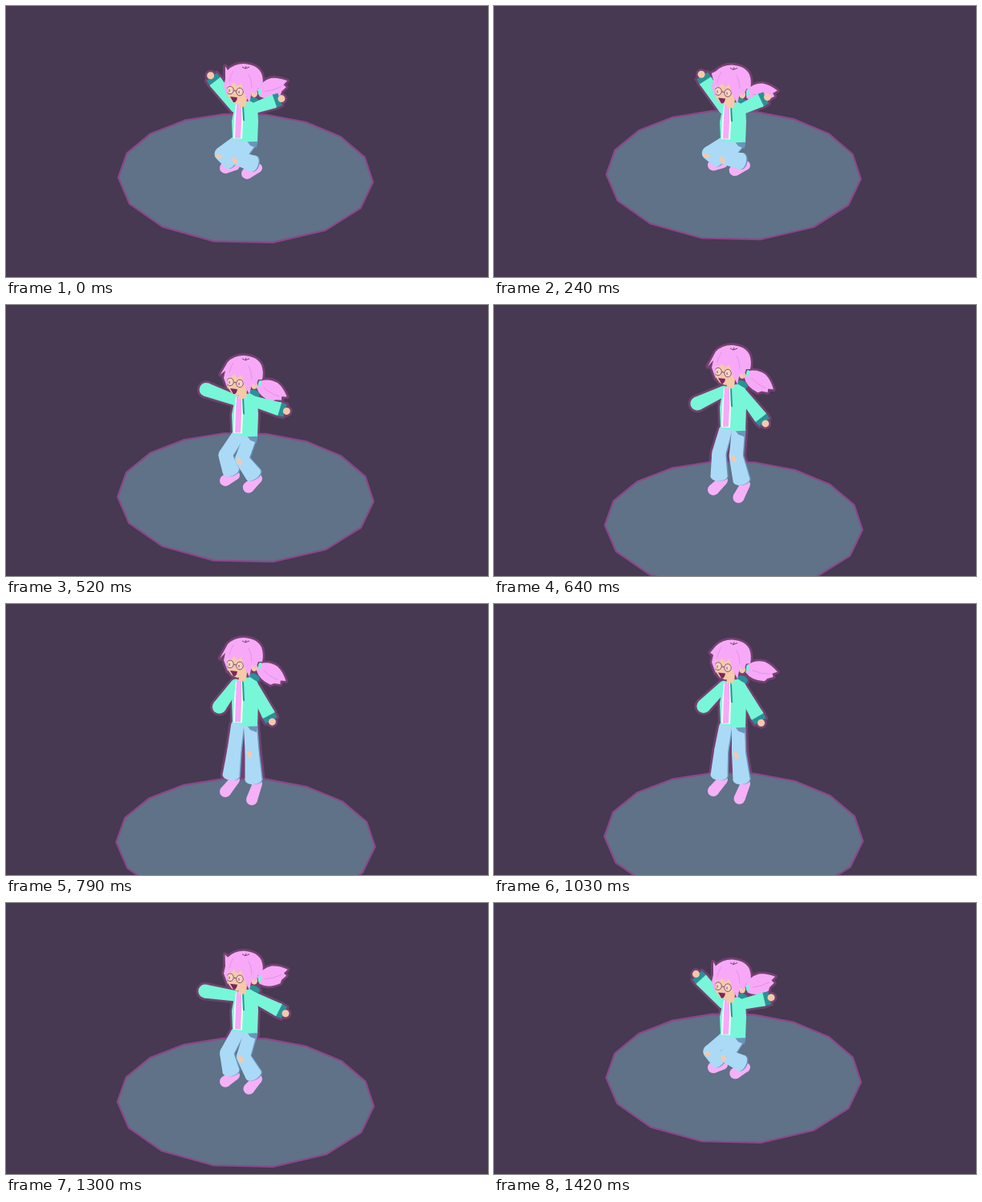
These frames come from a looping animation (600x338 px, 1450 ms). An HTML page with a canvas:

```html
<!DOCTYPE html>
<html lang="en">
<head>
<meta charset="utf-8">
<title>Jump loop</title>
<style>
html, body { margin: 0; width: 100%; height: 100%; overflow: hidden; background: #463951; }
canvas { display: block; width: 600px; height: 338px; }
</style>
</head>
<body>
<canvas id="stage" width="600" height="338"></canvas>
<script>
const ctx = document.getElementById('stage').getContext('2d');
const LOOP = 1450, LEAP = 83, DEG = Math.PI / 180;
const C = {
  bg: '#463951', floor: '#5f7287', rim: '#8b478b', outline: '#72416f',
  hair: '#f7a9f8', hairShade: '#dc8fe0', skin: '#f5c9a9', ink: '#74436a',
  mouth: '#7c2560', coat: '#77f7d7', coatDark: '#2b9097', white: '#effcfb',
  jeans: '#abdaf6', jeansDark: '#6a95ba', shoe: '#f6b0f7', lens: '#f7d5c4'
};

// How far the floor has dropped over one loop: [time, pixels]
const drops = [
  [0, 0], [110, -7], [240, -4], [520, 25], [550, 38],
  [790, 83], [900, 86], [1030, 76], [1300, 34], [1420, 4]
];

// Periodic monotone cubic interpolation
function floorDrop(t) {
  const n = drops.length;
  const key = i => {
    const wrap = Math.floor(i / n), [time, y] = drops[i - wrap * n];
    return [time + wrap * LOOP, y];
  };
  let i = n - 1;
  while (drops[i][0] > t) i--;
  const [a, b, c, d] = [i - 1, i, i + 1, i + 2].map(key);
  const h = c[0] - b[0], u = (t - b[0]) / h, rise = c[1] - b[1];
  const slope = (p, q) => (q[1] - p[1]) / (q[0] - p[0]);
  const tangent = (p, q) => p * q > 0 ? 2 * p * q / (p + q) * h : 0;
  const m0 = tangent(slope(a, b), rise / h), m1 = tangent(rise / h, slope(c, d));
  return b[1] + u * (m0 + u * (3 * rise - 2 * m0 - m1 + u * (m0 + m1 - 2 * rise)));
}

let outlining = false;

function paint(path, color) {
  ctx.fillStyle = outlining ? C.outline : color;
  ctx.fill(path);
  if (outlining) {
    ctx.strokeStyle = C.outline;
    ctx.lineWidth = 5.5;
    ctx.stroke(path);
  }
}

function poly(points, color) {
  const p = new Path2D();
  points.forEach(([x, y]) => p.lineTo(x, y));
  p.closePath();
  paint(p, color);
  return p;
}

const shape = (d, color) => paint(new Path2D(d), color);

function oval(x, y, rx, ry, color, turn = 0) {
  const p = new Path2D();
  p.ellipse(x, y, rx, ry, turn, 0, Math.PI * 2);
  paint(p, color);
  return p;
}

function line(path, color, width = 1) {
  if (outlining) return;
  ctx.strokeStyle = color;
  ctx.lineWidth = width;
  ctx.stroke(typeof path === 'string' ? new Path2D(path) : path);
}

function taper([x1, y1], [x2, y2], w1, w2, color) {
  const len = Math.hypot(x2 - x1, y2 - y1) || 1;
  const nx = (y1 - y2) / len / 2, ny = (x2 - x1) / len / 2;
  poly([[x1 + nx * w1, y1 + ny * w1], [x2 + nx * w2, y2 + ny * w2],
    [x2 - nx * w2, y2 - ny * w2], [x1 - nx * w1, y1 - ny * w1]], color);
}

function capsule(a, b, w1, w2, color) {
  taper(a, b, w1, w2, color);
  oval(...a, w1 / 2, w1 / 2, color);
  oval(...b, w2 / 2, w2 / 2, color);
}

function leg(hip, knee, ankle, toe) {
  capsule([ankle[0] + 5, ankle[1] + 5], toe, 12, 14, C.shoe);
  const cloth = (shift, color) => {
    const [h, k, a] = [hip, knee, ankle].map(([x, y]) => [x + shift, y]);
    capsule(h, k, 16, 17, color);
    taper(k, a, 17, 21, color);
    oval(...a, 10.5, 6, color, Math.atan2(a[1] - k[1], a[0] - k[0]) - Math.PI / 2);
  };
  cloth(1.5, C.jeansDark);
  cloth(0, C.jeans);
}

function arm([x, y], angle, length, bare) {
  const at = k => [x + Math.cos(angle) * k, y - Math.sin(angle) * k];
  capsule([x, y], at(length - 4), 13, 17, C.coat);
  if (!bare) return;
  taper(at(length - 3), at(length + 4), 17, 16, C.coatDark);
  oval(...at(length + 6), 4.5, 4.5, C.skin);
}

function tail(angle, head) {
  ctx.save();
  ctx.translate(315, 78 + head);
  ctx.rotate(angle);
  shape('M-1 -4 Q8 -13 20 -12 Q29 -10 38 -2 L32 1 L34 5 L27 8 L24 12 Q8 14 -1 5 Z', C.hair);
  line('M7 1 Q18 4 29 2', C.hairShade, .8);
  ctx.restore();
}

function torso(neck, hip) {
  const at = (x, u) => [x, neck + (hip - neck) * u];
  oval(309, neck - 1, 7, 5, C.coatDark, .4);
  poly([at(285, .07), at(292, 0), at(304, -.03), at(313, .08), at(314, .5),
    at(313, 1.04), at(302, 1.05), at(282, .98), at(281, .5)], C.coat);
  if (outlining) return;
  poly([at(286, .06), at(294, .02), at(295, .5), at(294, .97), at(283, .96), at(284, .45)], C.white);
  poly([at(287, .05), at(293, .03), at(293, .5), at(292, .95), at(285, .95), at(286, .4)], C.hair);
  poly([at(294, .02), at(296, .1), at(297, .5), at(295, .48)], C.coatDark);
}

function drawHead(head, flick) {
  ctx.save();
  ctx.translate(0, head);
  shape('M289 84 L300 84 L299 95 L290 97 Z', C.skin);
  oval(309, 79, 4, 5, C.skin);
  shape('M274 64 L276 82 L281 89 L288 92 L298 88 L304 64 Z', C.skin);
  if (!outlining) {
    shape('M279 83 L288 84 Q287 91 283 90 Z', C.mouth);
    for (const x of [279, 291]) {
      const y = 75 + (x - 279) / 6;
      line(oval(x, y, 4.3, 4.8, C.lens), C.ink, .9);
      line(`M${x - 1} ${y - 1} v3`, C.ink);
    }
    line('M283.5 75.5 L286.5 76', C.ink);
  }
  shape(`M273 61 L${266 + flick * 7} ${69 - flick * 24} L276 50 Q284 42 296 42
    Q313 43 318 54 Q321 62 319 72 L314 72 L311 80 L306 77 L303 91 L299 83
    L296 77 L293 66 L288 70 L284 65 L279 70 L275 67 L276 84 L271 70 Z`, C.hair);
  oval(316, 77, 2, 4, C.coat, .2);
  line('M294 46 L298 48 L303 46 M298 48 L299 45', C.ink);
  line('M283 51 Q279 57 278 64 M302 55 Q306 62 306 72', C.hairShade, .8);
  ctx.restore();
}

// The whole body follows one value: 0 is a crouch, 1 is fully stretched.
function figure(stretch, sway) {
  const s = stretch, bend = 1 - s;
  const head = 30 * bend, neck = 120 - 27 * s, hip = 167 - 17 * s;
  const push = 1 - bend ** 3, swing = 1 - Math.max(bend, 0) ** 1.6;
  const ankleL = [280, 194 + 20 * push], ankleR = [308, 197 + 22 * push];
  const kneeL = [268 + 16 * s, (hip + ankleL[1]) / 2 + 4 * bend];
  const kneeR = [288 + 18 * s, (hip + ankleR[1]) / 2 + 8 * bend];
  const leftAngle = (128 + 106 * s) * DEG;

  tail((7 + 27 * sway) * DEG, head);
  leg([288, hip + 2], kneeL, ankleL, [ankleL[0] - 7, ankleL[1] + 8 + 12 * s]);
  if (s < .2) oval(kneeL[0] - 3, kneeL[1] + 3, 4, 2.5, C.skin, .4);
  leg([304, hip + 2], kneeR, ankleR, [ankleR[0] - 8 + 6 * s, ankleR[1] + 12 + 13 * s]);
  oval(kneeR[0] - 3, kneeR[1] + 3, 2.8, 4.5, C.skin, -.5);
  poly([[299, hip], [313, hip + 1], [312, hip + 10], [304, hip + 7]], C.jeansDark);
  arm([286, neck + 7], leftAngle, 45 - 6 * s, s < .2);
  torso(neck, hip);
  arm([307, neck + 8], (19 - 81 * swing) * DEG, 32 + 14 * swing, true);
  drawHead(head, (1 - sway) / 2);
}

// A sixteen-sided disc seen in perspective
function drawFloor(drop) {
  const p = new Path2D(), sides = 16, scale = 1 + drop * .0002;
  for (let i = 0; i < sides; i++) {
    const angle = (i + .5) / sides * Math.PI * 2 + .035;
    const depth = Math.sin(angle), near = 1 / (1 - .176 * depth);
    const x = 1.5 + 156 * Math.cos(angle) * near + 4.5 * depth;
    p.lineTo(296 + x * scale, 201 + 78.7 * depth * near + drop);
  }
  p.closePath();
  ctx.fillStyle = C.floor;
  ctx.fill(p);
  ctx.strokeStyle = C.rim;
  ctx.lineWidth = 2.2;
  ctx.stroke(p);
}

function draw(t) {
  const drop = floorDrop(t);
  const sway = Math.cos((t - 690) / LOOP * Math.PI * 2);
  ctx.lineJoin = 'round';
  ctx.fillStyle = C.bg;
  ctx.fillRect(0, 0, 600, 338);
  // The outline shows only against the backdrop, so the floor covers it.
  outlining = true;
  figure(drop / LEAP, sway);
  outlining = false;
  drawFloor(drop);
  figure(drop / LEAP, sway);
}

const start = performance.now();
function tick() {
  draw((performance.now() - start) % LOOP);
  requestAnimationFrame(tick);
}
tick();
</script>
</body>
</html>
```
